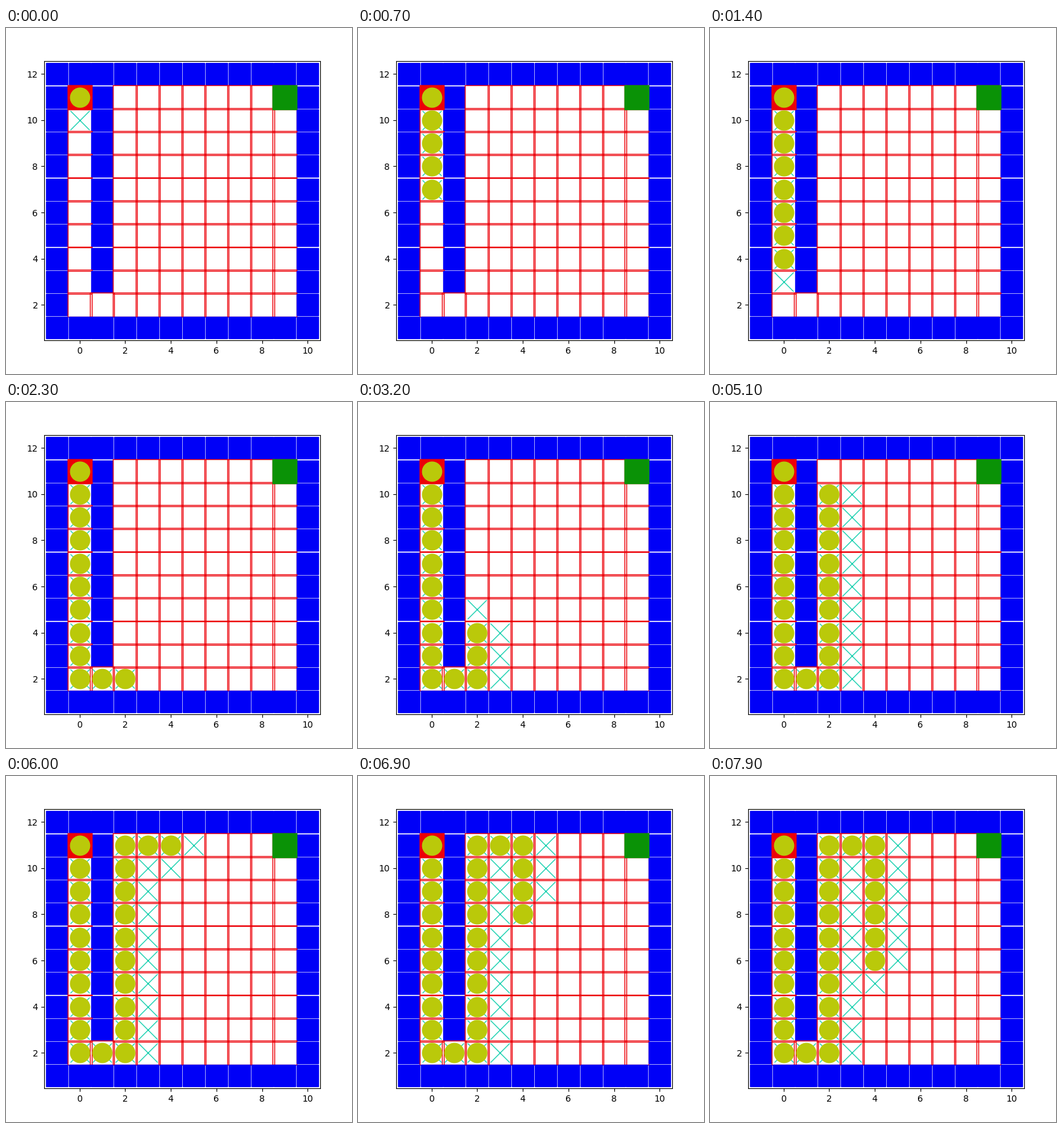
These frames come from a looping animation (544x544 px, 8000 ms). A matplotlib script:

```python
import numpy as np
import matplotlib.pyplot as plt
from matplotlib.animation import FuncAnimation

SIZE, DPI, FRAMES = 544, 100, 80
LEFT, RIGHT, TOP, BOTTOM = 60, 494, 52.43, 491.3   # axes box in pixels
COLS, ROWS = range(-1, 11), range(12, 0, -1)
START, GOAL = (0, 11), (9, 11)
BLUE, RED, GREEN = "#0000f7", "#ec0008", "#0a9206"
YELLOW, TEAL = "#bac90a", "#1cd0b0"

fig = plt.figure(figsize=(SIZE / DPI, SIZE / DPI), dpi=DPI, facecolor="white")
ax = fig.add_axes([LEFT / SIZE, 1 - BOTTOM / SIZE,
                   (RIGHT - LEFT) / SIZE, (BOTTOM - TOP) / SIZE])
ax.set_xlim(-1.55, 10.55)
ax.set_ylim(0.45, 12.55)
ax.set_xticks(range(0, 11, 2))
ax.set_yticks(range(2, 13, 2))


def mark(cell, shape, size, color, face=None, z=2):
    return ax.plot(*cell, shape, ms=size, mec=color,
                   mfc=face or color, mew=1, zorder=z)[0]


def is_free(x, y):
    return 0 <= x <= 9 and 2 <= y <= 11 and not (x == 1 and y > 2)


def draw_maze():
    # Later cells cover the rims of earlier ones
    for y in ROWS:
        for x in COLS:
            if is_free(x, y):
                mark((x, y), "s", 27, RED, "none")
            else:
                mark((x, y), "s", 25, BLUE)
    mark(START, "s", 27, RED)
    mark(GOAL, "s", 27, GREEN)


def search():
    """Depth-first search as a list of drawing steps."""
    steps, stack, seen, closed = [], [START], {START}, set()
    while stack and len(steps) < 90:
        x, y = cell = stack.pop()
        closed.add(cell)
        steps.append(("visit", cell))
        for dx, dy in ((1, 0), (0, 1), (0, -1), (-1, 0)):
            near = (x + dx, y + dy)
            if not is_free(*near) or near in closed:
                continue
            if near in seen:
                steps.append(("again", near))
                continue
            seen.add(near)
            stack.append(near)
            steps.append(("open", near))
    return steps


def draw_step(kind, cell):
    if kind == "visit":
        return mark(cell, "o", 22, YELLOW, z=2.2)
    if kind == "open":
        return mark(cell, "x", 22, TEAL, z=2.1)
    return None


draw_maze()
marks = [draw_step(kind, cell) for kind, cell in search()]

# Search pace: last step shown at a few moments
PACE_T = (0, 14, 32, 41, 51, 79)
PACE_N = (1, 15, 30, 39, 47, 75)


def update(frame):
    last = int(np.interp(frame, PACE_T, PACE_N) + 1e-6)
    shown = [(i, m) for i, m in enumerate(marks) if m is not None]
    for i, m in shown:
        m.set_visible(i <= last)
    return [m for _, m in shown]


anim = FuncAnimation(fig, update, frames=FRAMES, interval=100,
                     repeat=True, repeat_delay=0, blit=False)
plt.show()
```
